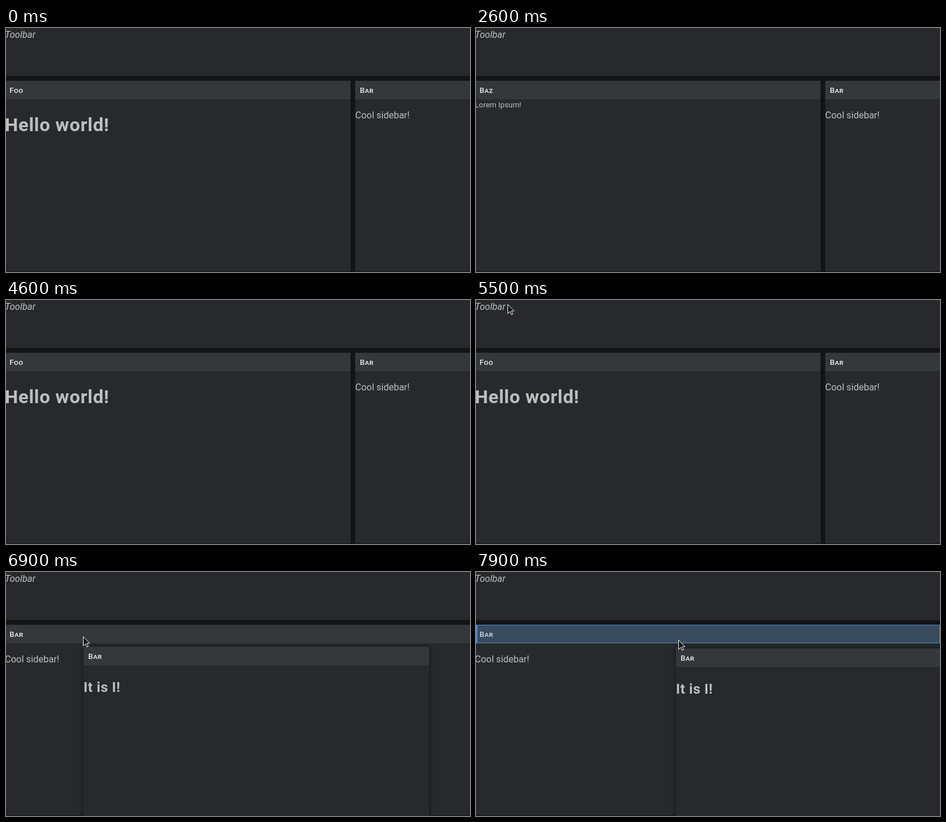
An HTML page that plays this animation: 796 px wide and 421 px high, repeating every 8 s.

```html
<!DOCTYPE html>
<html lang="en">
<head>
<meta charset="utf-8">
<title>Dock panels</title>
<style>
  html, body { margin: 0; width: 100%; height: 100%; overflow: hidden; background: #121416; }
  svg { display: block; width: 796px; height: 421px; }
  text { font: 16px Roboto, sans-serif; fill: #bdbfbf; white-space: pre; }
  .toolbar { font-style: italic; }
  .title { font-size: 13px; font-weight: 500; font-variant: small-caps; letter-spacing: .02em; fill: #e4e6e8; }
  .h1 { font-size: 32px; font-weight: 700; letter-spacing: .02em; }
  .h2 { font-size: 24px; font-weight: 700; letter-spacing: .02em; }
  .small { font-size: 13px; }
  .body { fill: #27292c; }
  .head { fill: #35383b; }
  .lifted { filter: drop-shadow(0 0 4px rgba(0, 0, 0, .45)); }
</style>
</head>
<body>
<svg viewBox="0 0 796 421">
  <rect class="body" width="796" height="83"/>
  <text class="toolbar" x="-2" y="17">Toolbar</text>

  <g id="sidebar">
    <rect class="body" y="91" width="798" height="329"/>
    <rect class="head" y="91" width="798" height="32"/>
    <text class="title" x="8" y="112">Bar</text>
    <text y="156">Cool sidebar!</text>
  </g>

  <g id="overlay">
    <rect id="zone" x="-.5" width="796" fill="#4a90d9" fill-opacity=".22" stroke="#4a8ac6"/>
    <rect id="edge" width="2.5" fill="#4a8ac6"/>
  </g>

  <g id="main">
    <rect class="body" y="91" width="593" height="329"/>
    <rect class="head" y="91" width="593" height="32"/>
    <text class="title" id="mainTitle" x="8" y="112"></text>
    <text id="mainText"></text>
  </g>

  <path id="cursor" d="M.5 .5V16.5L4.2 13L6.8 18.3L9.2 17.2L6.7 12H11.5Z"
        fill="#17191b" stroke="#f2f2f2" stroke-linejoin="round"/>
</svg>
<script>
const LOOP = 8000, STEP = 100, FIRST_SWITCH = 200, SWITCH_EVERY = 2000;
const CURSOR_IN = 5400, DRAG_START = 6900, OVERLAY_IN = 7000;

const pages = [
  { title: 'Foo', text: 'Hello world!', style: 'h1', y: 178 },
  { title: 'Bar', text: 'It is I!', style: 'h2', y: 169 },
  { title: 'Baz', text: 'Lorem Ipsum!', style: 'small', y: 137 }
];

// Each key is [time, x, y].
const cursorPath = [
  [5400, 52, -8], [5500, 54, 7], [5800, 62, 34], [6100, 80, 78], [6400, 92, 103],
  [6700, 94, 105], [6900, 132, 111], [7100, 190, 118], [7500, 285, 120], [7900, 347, 117]
];
const dragPath = [[6900, 135, 38], [7100, 195, 45], [7500, 288, 46], [7900, 345, 41]];
// Top and bottom of the drop zone.
const zonePath = [[7000, 134, 421], [7100, 99, 178], [7200, 91, 123]];

const el = id => document.getElementById(id);
const set = (id, attrs) => {
  for (const name in attrs) el(id).setAttribute(name, attrs[name]);
};
const show = (id, on) => set(id, { visibility: on ? 'visible' : 'hidden' });
const move = (id, x, y) => set(id, { transform: `translate(${x} ${y})` });

function along(path, t) {
  if (t <= path[0][0]) return path[0].slice(1);
  const i = path.findIndex(key => key[0] >= t);
  if (i < 0) return path[path.length - 1].slice(1);
  const [a, b] = [path[i - 1], path[i]];
  const k = (t - a[0]) / (b[0] - a[0]);
  return [1, 2].map(n => Math.round(a[n] + (b[n] - a[n]) * k));
}

function render(t) {
  const switches = Math.max(0, Math.floor((t - FIRST_SWITCH) / SWITCH_EVERY) + 1);
  const page = pages[switches % pages.length];
  el('mainTitle').textContent = page.title;
  el('mainText').textContent = page.text;
  set('mainText', { class: page.style, y: page.y });

  const dragging = t >= DRAG_START;
  move('sidebar', dragging ? -2 : 599, 0);
  move('main', ...(dragging ? along(dragPath, t) : [0, 0]));
  if (dragging) {
    const [x, y] = along(dragPath, t);
    move('main', x - 2, y);
  } else {
    move('main', -2, 0);
  }
  set('main', { class: dragging ? 'lifted' : '' });

  const [top, bottom] = along(zonePath, t);
  show('overlay', t >= OVERLAY_IN);
  set('zone', { y: top + .5, height: bottom - top - 1 });
  set('edge', { y: top, height: bottom - top });

  show('cursor', t >= CURSOR_IN);
  move('cursor', ...along(cursorPath, t));
}

const start = performance.now();
function tick() {
  const t = (performance.now() - start) % LOOP;
  render(Math.floor(t / STEP) * STEP);
  requestAnimationFrame(tick);
}
render(0);
requestAnimationFrame(tick);
</script>
</body>
</html>
```
